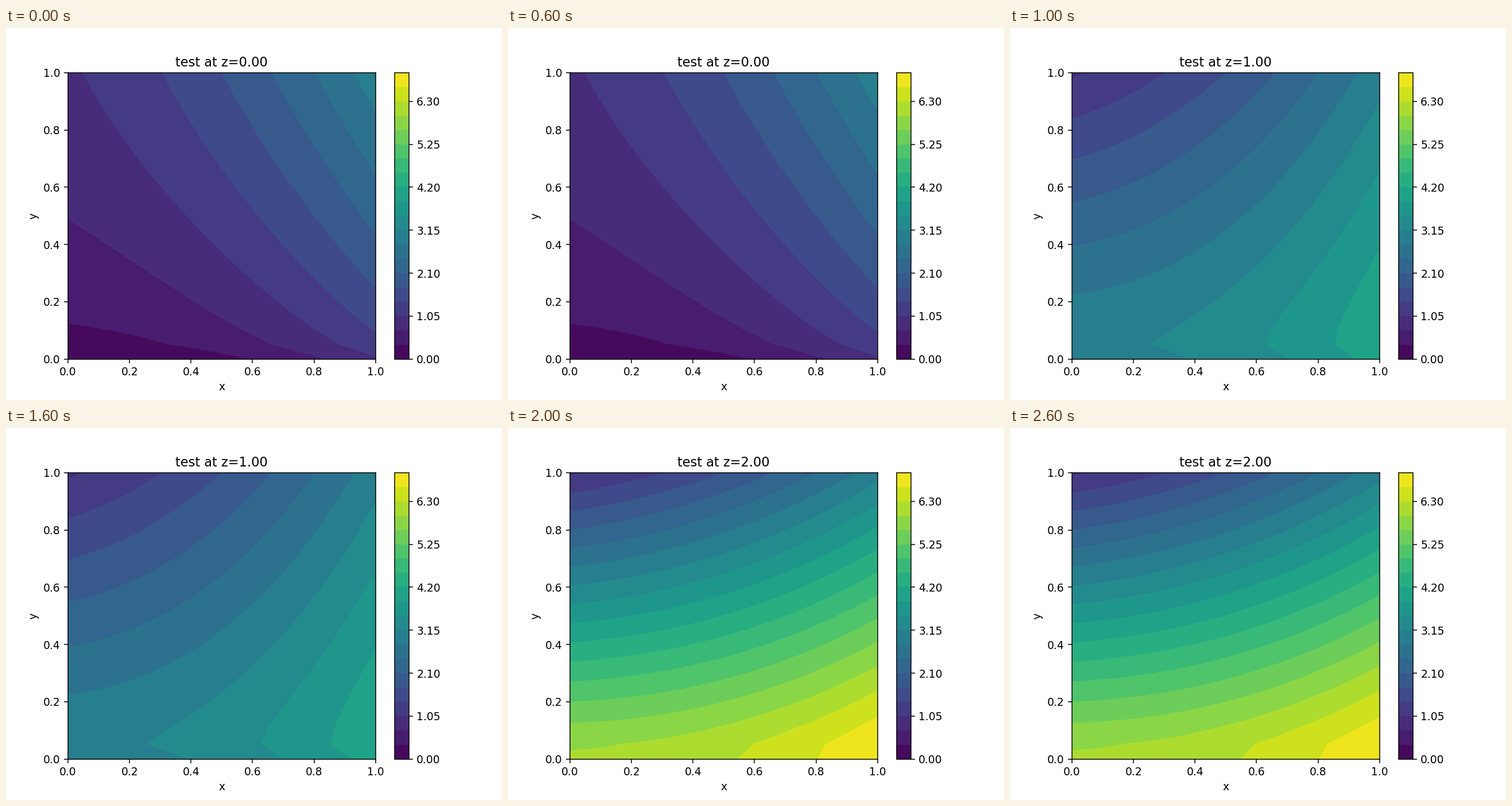
Write a matplotlib script that moves like this. It is 864 px wide and 648 px high and loops after 3000 ms.

```python
import numpy as np
import matplotlib.pyplot as plt
from matplotlib.animation import FuncAnimation

HEIGHTS = [0.0, 1.0, 2.0]
LEVELS = np.linspace(0, 7, 21)


def field(x, y, z):
    return x**2 + x * y + np.sqrt(y) + 3 * z * (1 - y)


axis = np.linspace(0, 1, 20)
x, y = np.meshgrid(axis, axis)

fig, ax = plt.subplots(figsize=(6.4, 4.8), dpi=135)
slices = [ax.contourf(x, y, field(x, y, z), levels=LEVELS, cmap="viridis")
          for z in HEIGHTS]
fig.colorbar(slices[0], ax=ax)
ax.set_xlabel("x")
ax.set_ylabel("y")
title = ax.set_title("")


def update(i):
    for k, contours in enumerate(slices):
        contours.set_visible(k == i)
    title.set_text(f"test at z={HEIGHTS[i]:.2f}")
    return [*slices, title]


anim = FuncAnimation(fig, update, frames=len(HEIGHTS), interval=1000,
                     repeat=True, repeat_delay=0, blit=False)
plt.show()
```
